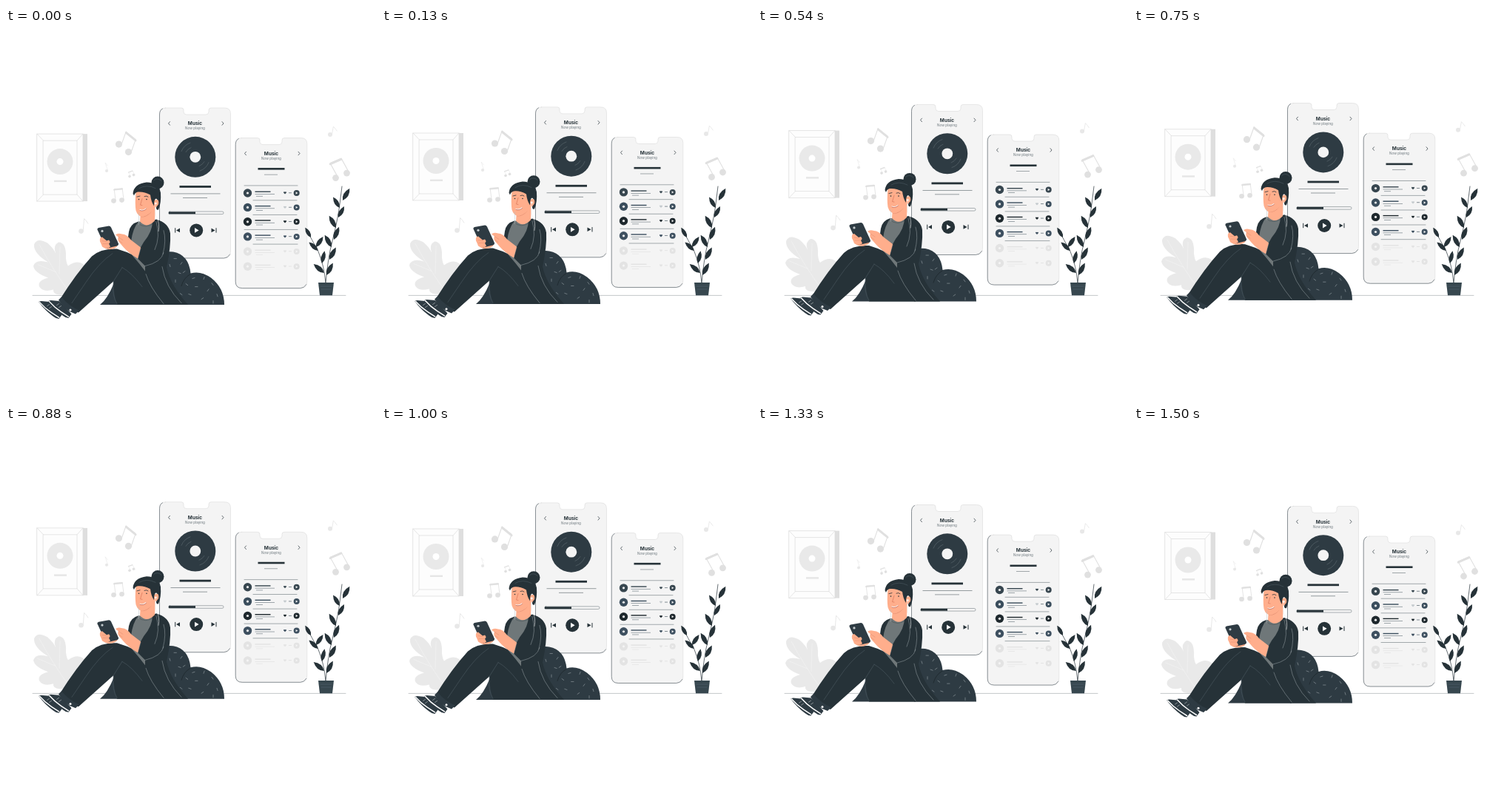
Write an HTML page that moves like this. It is 500 by 500 pixels and loops after 1.54 s.

```html
<!DOCTYPE html>
<html lang="en">
<head>
<meta charset="utf-8">
<style>
html, body { margin: 0; height: 100%; overflow: hidden; background: #fff; }
svg { display: block; width: 100%; height: 100%; }
text { font-family: Inter, sans-serif; text-anchor: middle; }
</style>
</head>
<body>
<svg id="stage" viewBox="0 0 500 500" fill="none" stroke-linecap="round" stroke-linejoin="round"></svg>
<script>
const INK = '#263238', SLATE = '#2e3b43', SKIN = '#ffae8c', PALE = '#e0e0e0', PAPER = '#f4f4f4';
const LOOP = 1540, STEPS = 37, LIFT = 7;

const fill = (d, color) => `<path d="${d}" fill="${color}"/>`;
const line = (d, color = INK, width = .7) => `<path d="${d}" stroke="${color}" stroke-width="${width}"/>`;
const dot = (x, y, r, color) => `<circle cx="${x}" cy="${y}" r="${r}" fill="${color}"/>`;
const bar = (x1, x2, y, h, color = INK) =>
  `<rect x="${x1}" y="${y - h / 2}" width="${x2 - x1}" height="${h}" fill="${color}"/>`;
const label = (x, y, size, weight, color, text) =>
  `<text x="${x}" y="${y}" font-size="${size}" font-weight="${weight}" fill="${color}">${text}</text>`;

// Two heads joined by a beam; (dx, dy) runs along each stem.
function pair(x1, y1, x2, y2, dx, dy, r) {
  const s = r * .8;
  return dot(x1, y1, r, PALE) + dot(x2, y2, r, PALE) +
    line(`M${x1 + s} ${y1}l${dx} ${dy}L${x2 + s + dx} ${y2 + dy}l${-dx} ${-dy}`, PALE, r * .25) +
    line(`M${x1 + s + dx} ${y1 + dy + r * .3}L${x2 + s + dx} ${y2 + dy + r * .3}`, PALE, r * .6);
}

const single = (x, y, dx, dy, r) => dot(x, y, r, '#e8e8e8') +
  line(`M${x + r * .8} ${y}l${dx} ${dy}q${r} ${r} ${r * 1.6} ${r * 2}`, '#e8e8e8', r * .3);

function phone(x, y, w, notchX, notchW) {
  const c = x + w / 2;
  return `<path d="M${x + 8} ${y}H${notchX - 3}q3 0 3 3v2q0 4 4 4h${notchW - 8}q4 0 4 -4v-2q0 -3 3 -3H${x + w - 8}
    q8 0 8 8V${y + 194}q0 9 -9 9H${x + 9}q-9 0 -9 -9V${y + 8}q0 -8 8 -8z" fill="${PAPER}" stroke="#dadada" stroke-width=".6"/>` +
    line(`M${x + 4} ${y + 1}q-4 2 -4 8V${y + 194}q0 9 9 9H${x + w - 9}q5 0 8 -5`, '#4a575e', .6) +
    label(c, y + 23.3, 6.5, 700, INK, 'Music') +
    label(c, y + 29.2, 4.6, 400, '#6c777d', 'Now playing') +
    line(`M${c - 34} ${y + 18.6}l-2 2.300l2 2.300M${c + 36.5} ${y + 18.6}l2 2.300l-2 2.300`);
}

function track(y, i) {
  const faded = i > 3;
  const color = faded ? '#e3e3e3' : ['#37464f', '#3a4d5c', '#1e282d', '#3e5060'][i];
  const thin = faded ? '#e0e0e0' : '#65727a';
  return dot(326.5, y, 5.7, color) + dot(326.5, y, 1.6, PAPER) +
    bar(336.5, 357.5, y - 1.8, 1.4, color) + bar(336.5, 363, y + 1.4, .6, thin) + bar(338, 347, y + 4.2, .6, thin) +
    fill(`M377 ${y + 1.6}l-2 -2q0 -2 2 -1q2 -1 2 1z`, i === 1 ? '#c4cacd' : color) +
    bar(382, 386, y - .2, .8, thin) + dot(392.7, y, 4, color) +
    fill(`M391.6 ${y - 1.7}v3.4l2.8 -1.7z`, PAPER);
}

const leaf = ([x, y, angle, size]) =>
  `<path transform="translate(${x} ${y}) rotate(${angle}) scale(${size})" d="M0 0Q-6 -7 0 -17Q6 -8 0 0" fill="${INK}"/>`;

const foliage =
  fill('M100 361H72Q63 360 64 354Q50 358 45 350Q42 342 57 338Q38 331 37 322Q40 312 57 317Q37 305 38 293Q42 283 56 291Q65 299 67 305Q63 294 71 290Q82 290 81 312Q82 320 84 322Q96 313 105 320Q112 326 103 338z', '#e9e9e9') +
  line('M45 293Q62 325 88 361M43 320L67 330M73 296L72 333', '#f3f3f3', .7);

const picture =
  fill('M104 143.500h6v91h-6z', '#dedede') +
  `<path d="M42 143.500H104V234.500H42zM50.500 152.500H96V225.500H50.500zM42 143.500l8.500 9M104 143.500l-8 9M42 234.500l8.500 -9M104 234.500l-8 -9"
    fill="#fdfdfd" stroke="#dcdcdc" stroke-width=".7"/>` +
  dot(73, 181, 17.5, '#e9e9e9') + dot(73, 181, 4.5, '#fff') + bar(65, 82, 207.3, 2.4, '#e6e6e6');

const player = phone(207.5, 108.4, 96, 240, 34) +
  dot(255.8, 174.7, 27.5, SLATE) +
  line('M237 167a20 20 0 0 1 12 -11.500M274 182a20 20 0 0 1 -12 11.500M243 168a14 14 0 0 1 7 -6M268 181a14 14 0 0 1 -7 6', '#77838a', .4) +
  dot(255.8, 174.7, 7.4, PAPER) +
  bar(234.5, 277, 214.8, 2.8) + bar(222.5, 289.5, 224.3, .8, '#7d868a') + bar(239, 272, 229.8, .8, '#7d868a') +
  '<rect x="219.500" y="248.400" width="74.500" height="3.600" rx="1.800" stroke="#5a666c" stroke-width=".5"/>' +
  bar(220, 256, 250.2, 2.8) +
  dot(257.2, 273.8, 9, INK) + fill('M255 270.400v6.800l5.600 -3.400z', '#fff') +
  fill('M235 271v5.600l-5 -2.800zM277.500 271v5.600l5 -2.800z', INK) +
  line('M228.700 271v5.600M284 271v5.600', INK, 1);

const playlist = phone(310.2, 149, 96.6, 343, 30) +
  bar(340.5, 376.5, 190.7, 2.6) + bar(349, 367, 198.5, .7, '#7d868a') +
  line('M322 213.300H394M334 233.200H393M334 252.800H393M322 272.800H394M334 292.500H394', '#5d696f', .55) +
  [223.4, 242.8, 262.2, 282.3, 302.4, 322.6].map(track).join('');

const notes = pair(152.5, 157.5, 165.5, 168, 6, -17, 4.6) + pair(445.5, 203, 460.5, 196.5, -11, -20, 4.4) +
  pair(145.5, 234, 156.5, 233, -2, -16, 3.3) + pair(167, 201, 172.5, 199, -3, -6, 1.8) +
  single(136, 193.5, -3.5, -11, 2) + single(438, 144.5, 2, -11, 3) + single(101.5, 275, 1.5, -17, 3.3);

// Beanbag with scattered stitches
const stitches = [[227, 312], [238, 317], [222, 323], [233, 331], [242, 329], [229, 344], [243, 346], [255, 338],
  [267, 340], [278, 345], [259, 350], [272, 356], [285, 360], [250, 361], [264, 367], [280, 369], [238, 361]];
const beanbag =
  fill('M127 374.500Q137 367 146 345L205 330V309Q214 301 226 303Q247 307 249.500 332Q263 328 277 338Q295 352 295 374.500z', SLATE) +
  stitches.map(([x, y], i) => {
    const a = i * 2.2;
    return line(`M${x} ${y}l${(3.4 * Math.cos(a)).toFixed(1)} ${(3.4 * Math.sin(a)).toFixed(1)}`, '#9aa4a9', .6);
  }).join('') + line('M249 333Q240 338 237 349', '#1d272c', .8);

const shoe = (x, y) =>
  `<g transform="translate(${x} ${y})">` +
  fill('M0 0Q0 -1.500 3 -1.500L14 -.500Q22 7 31 17L27 22.500Q23 22.500 19 19Q8 11 0 0z', SLATE) +
  line('M1 0Q8 8 17 14L27 20.500', '#fff', 1.5) + line('M14 3l-3 2M17 6l-3 2', '#c5cacc', .6) + '</g>';

const legs =
  shoe(44.5, 371) + shoe(57.5, 370) +
  fill('M73 367Q95 332 116 309Q128 298 150 299Q176 306 200 326L213 374.500H150Q146 362 145 343L98 385Q82 381 73 367z', INK) +
  fill('M71 368l4 -4Q86 377 99 382l-5 5Q78 382 71 368z', SLATE) +
  line('M144 305Q126 317 108 344L89 372M145 343L157 324M145 343Q143 362 150 373M157 324Q170 331 184 350', '#526068', .5) +
  dot(87, 381.3, 1.5, '#fff');

const torso =
  fill('M179 262Q168 268 166 284L164 300Q180 318 195 338L205 262z', '#6f7779') +
  line('M178 264Q188 273 200 264', '#50595c', .7) +
  fill('M179 262Q168 265 166 276L164 290L169 289Q171 272 179 262z', INK) +
  fill('M203 259Q220 264 222 278Q223 296 217 324Q222 348 246 374.500H211Q195 356 188 333L188 322L178 312L182 297L186 290Q198 276 198 261z', INK) +
  line('M203 262Q209 282 201 300M182 298L178 312M188 322Q210 317 213 304M213 274Q217 287 212 306M189 333Q194 350 213 373M211 323Q215 350 237 372', '#9da6aa', .5);

const head =
  fill('M182 246L181 262Q190 272 201 261L202 238z', SKIN) + line('M183 255.500Q190 256 196 249', '#e18d70', .8) +
  dot(205, 209.3, 8.5, INK) +
  fill('M175.500 221Q174 238 175.500 247Q178 255.500 185 255.500Q196 252 201 243Q207 243 207 236Q206 231 201 233L199 217z', SKIN) +
  fill('M171.500 224Q173 211 190 209Q206 209 209 223Q210 237 206 246Q203 247 203 243Q209 235 203 231Q200 231 200 241Q196 235 195 226Q186 221 178 222Q174 223 173 227z', INK) +
  line('M200 206Q205 202 210 207M180 217Q190 211 202 217', '#536068', .5) +
  line('M177 228.500l4 -1M187 228q3 -1.500 5 .5', INK, .8) +
  dot(179.5, 232, .8, INK) + dot(190, 232, .8, INK) +
  line('M184 231L181.500 239.500L184 240', '#d97458', .7) +
  line('M181 246Q185 248 189 244.500', '#fff', 1.2) + line('M181 246.800Q185 248.800 189.500 245', '#a8473b', .6) +
  `<ellipse cx="203.500" cy="236.500" rx="2.800" ry="4" fill="${SKIN}"/>` +
  dot(202.3, 237.5, 1.4, '#fff') + line('M202.300 239Q200 249 204 257T206 275', '#eef0f0', .6) +
  line('M179.500 250V266', '#b9c0c3', .5);

const hands =
  fill('M127 288Q128 281 134 281L150 287Q153 296 147 298Q138 302 130 296z', SKIN) +
  fill('M125 270.500L139 268Q141 268 142 270L152 292Q152.500 294 150 295L137 298Q135 298 134 296L123.500 273Q123 271 125 270.500z', SLATE) +
  dot(130, 274.8, 1.6, '#c3cacd') +
  fill('M127 289Q126 283 130 283L136 288L139 287Q142 290 139 292L141 296Q137 300 131 296z', SKIN) +
  line('M130 288l6 1M131 292l7 0', '#df8a6c', .5) +
  fill('M182 297L178 312Q166 305 159 297L153 290Q150 286 152 283L148 280Q151 277 157 279Q163 279 169 287z', SKIN) +
  line('M152 283l6 4M153 288l4 3', '#df8a6c', .5);

const sprigs = [[455, 233, 30, 1.1], [451, 243, -32, 1], [449, 256, 28, 1], [446, 270, -30, 1.1],
  [443, 286, 22, 1.1], [440, 296, -30, 1.1], [437, 313, 28, 1.1], [412, 283, -30, .9],
  [419, 296, 34, 1], [422, 301, -48, 1], [427, 318, 12, 1], [430, 331, -50, 1.1], [433, 334, 28, 1.1]];
const plant =
  line('M432 345Q435 310 441 288Q449 255 451 238L454 214M432 345Q430 321 422 302Q414 287 405 271', INK, .7) +
  sprigs.map(leaf).join('') +
  fill('M422 344H443L441 361.300H424z', '#37474f') + line('M425 349H440M426 353H439', '#60717e', .4);

document.getElementById('stage').innerHTML =
  line('M36 361.400H459', '#9aa1a5', .6) +
  `<g id="float">${foliage}${picture}${player}${playlist}${notes}${beanbag}${legs}${torso}${head}${hands}</g>` + plant;

const floating = document.getElementById('float');

// Steady rise and fall at 24 steps per second
function draw(now) {
  const step = Math.floor((now % LOOP) / LOOP * STEPS);
  const phase = (step + 1) % STEPS / STEPS;
  const y = -LIFT * (1 - Math.abs(2 * phase - 1));
  floating.setAttribute('transform', `translate(0 ${y.toFixed(3)})`);
}

const start = performance.now();
function tick() {
  draw(performance.now() - start);
  requestAnimationFrame(tick);
}
tick();
</script>
</body>
</html>
```
